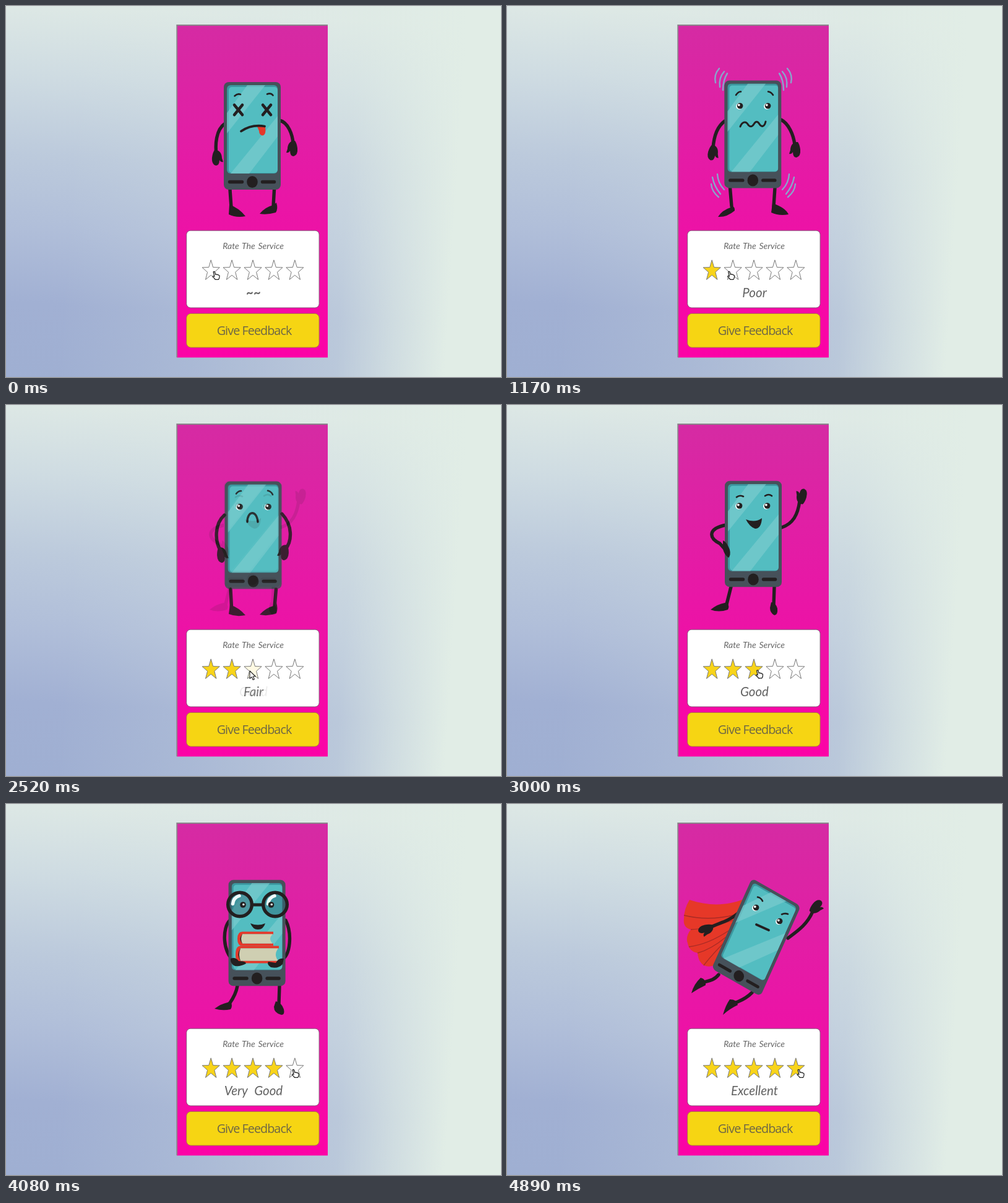
Write an HTML page that moves like this. It is 800 by 600 pixels and loops after 4.92 s.

```html
<!DOCTYPE html>
<html lang="en">
<head>
<meta charset="utf-8">
<title>Rate the service</title>
<style>
  html, body { margin: 0; width: 100%; height: 100%; overflow: hidden; }
  svg { display: block; width: 100vw; height: 100vh; }
  #poses { isolation: isolate; }
  .pose { mix-blend-mode: plus-lighter; }
  .limb { fill: none; stroke: #231f20; stroke-width: 5.4; stroke-linecap: round; }
  .line { fill: none; stroke: #231f20; stroke-width: 3; stroke-linecap: round; }
  .ink { fill: #231f20; }
  .label { font: italic 20.5px Lato, sans-serif; word-spacing: 6px; fill: #626262; text-anchor: middle; }
  .mark { font-weight: 700; }
  .title { font: italic 14px Lato, sans-serif; word-spacing: 1.5px; fill: #666; text-anchor: middle; }
  .button { font: 19.8px "Open Sans", "Noto Sans", sans-serif; letter-spacing: -.95px; fill: #6d6646; text-anchor: middle; }
</style>
</head>
<body>
<svg viewBox="0 0 800 600" preserveAspectRatio="none">
  <defs>
    <linearGradient id="sky" x1=".06" y1="0" x2="0" y2="1">
      <stop offset="0" stop-color="#dde8e5"/>
      <stop offset=".18" stop-color="#cfdce2"/>
      <stop offset=".4" stop-color="#bccadc"/>
      <stop offset=".6" stop-color="#b0bed9"/>
      <stop offset=".8" stop-color="#a1b0d3"/>
      <stop offset="1" stop-color="#9fafd2"/>
    </linearGradient>
    <linearGradient id="mist" gradientUnits="userSpaceOnUse" x1="100" y1="300" x2="725" y2="340">
      <stop offset="0" stop-color="#e1ede6" stop-opacity="0"/>
      <stop offset=".35" stop-color="#e1ede6" stop-opacity=".16"/>
      <stop offset=".72" stop-color="#e1ede6" stop-opacity=".4"/>
      <stop offset=".86" stop-color="#e1ede6" stop-opacity=".72"/>
      <stop offset="1" stop-color="#e1ede6"/>
    </linearGradient>
    <linearGradient id="pink" x1="0" y1="0" x2="0" y2="1">
      <stop offset="0" stop-color="#d52ba3"/>
      <stop offset=".5" stop-color="#e817a6"/>
      <stop offset="1" stop-color="#fc02a6"/>
    </linearGradient>
    <clipPath id="glass"><rect x="357" y="128" width="82" height="143" rx="6"/></clipPath>
    <g id="phone">
      <rect x="352" y="123" width="92" height="174" rx="8" fill="#46515a"/>
      <g clip-path="url(#glass)">
        <path fill="#3b979f" d="M357 128h82v143h-82z"/>
        <rect x="360" y="131" width="79" height="139" rx="5" fill="#53bdc1"/>
        <path fill="#7dcccf" opacity=".65" d="M390 128h29L357 206v-33zM439 178v33L393 271h-30z"/>
      </g>
      <ellipse class="ink" cx="398" cy="284.5" rx="8.8" ry="9.6"/>
      <path stroke="#231f20" stroke-width="5.4" stroke-linecap="round" d="M361.5 284.5h20M414.5 284.5h19"/>
    </g>
    <path id="hand" class="ink" d="M-4-12C5-13 8-5 8 1L10 7Q6 8 4 4Q4 13-2 13Q-9 11-8 0Q-7-8-4-12Z"/>
    <g id="eye">
      <circle cx="-.8" cy=".8" r="5" fill="#fff"/>
      <circle class="ink" cx=".6" r="4.8"/>
      <circle cx="-1.2" cy="-1.4" r="1.9" fill="#fff"/>
    </g>
    <g id="lens">
      <circle r="19.3" fill="#2d6c7b" fill-opacity=".5" stroke="#231f20" stroke-width="5.4"/>
      <path d="M-11.5-1Q-10.5-11-1-14" fill="none" stroke="#f1fafa" stroke-width="5.5" stroke-linecap="round"/>
    </g>
    <g id="shake" fill="none" stroke="#88a6cc" stroke-width="2.4" stroke-linecap="round">
      <path d="M343 101Q334 111 337 124M351 106Q342 116 344 131M356 109Q349 120 349 136"/>
      <path d="M330 288Q331 300 342 309M332 277Q335 292 345 304M340 272Q341 287 351 297"/>
    </g>
  </defs>

  <rect width="800" height="600" fill="url(#sky)"/>
  <rect width="800" height="600" fill="url(#mist)"/>
  <rect x="276" y="30.5" width="244" height="538" fill="url(#pink)"/>
  <path d="M276.2 568V31H520" fill="none" stroke="#8b838b" stroke-width="1.8"/>

  <rect x="291.7" y="363.2" width="214.4" height="124.8" rx="6.5" fill="#fff" stroke="#86597a"/>
  <rect x="291.7" y="497.4" width="214.4" height="54.8" rx="7" fill="#f6d513" stroke="#a97540"/>
  <text class="title" x="399.5" y="392.5">Rate The Service</text>
  <text class="button" x="401" y="532.3">Give Feedback</text>
  <g id="stars"></g>
  <g id="poses"></g>
  <g id="cursor" fill="#fff" stroke="#222" stroke-width="1.1" stroke-linejoin="round">
    <path id="arrow" d="M0 0V12.5L3 9.8L5.2 14.5L7.4 13.4L5.2 9H9.2Z"/>
    <path id="pointer" transform="scale(.86)" stroke-width="1.5" d="M-1 0Q1-1.5 2 1L3 5Q5 3.8 6 5.3Q8 4.5 8.6 6.2Q10.5 6 10.5 8Q10.8 12 8.5 14.5H2.5Q1 11.5-2 9.5Q-2.5 7.3 0 8.2L1 8.6Z"/>
  </g>
</svg>
<script>
const LOOP = 4920, FADE = 300;
const starts = [465, 1360, 2485, 3420, 4380];
const $ = id => document.getElementById(id);

const phone = (t = '') => `<use href="#phone" transform="${t}"/>`;
const limb = d => `<path class="limb" d="${d}"/>`;
const line = (d, w = 2.6) => `<path class="line" style="stroke-width:${w}" d="${d}"/>`;
const ink = d => `<path class="ink" d="${d}"/>`;
const fill = (d, c) => `<path fill="${c}" d="${d}"/>`;
const dot = (x, y, r, c) => `<circle cx="${x}" cy="${y}" r="${r}" fill="${c}"/>`;
const hand = (x, y, turn = 0, flip = 1) =>
  `<use href="#hand" transform="translate(${x} ${y}) rotate(${turn}) scale(${flip} 1)"/>`;
const eyes = (...spots) => spots.map(([x, y]) => `<use href="#eye" x="${x}" y="${y}"/>`).join('');
const lens = (x, y, eyeX) =>
  `<use href="#lens" x="${x}" y="${y}"/>` + dot(eyeX, y + .5, 4.8, '#231f20') + dot(eyeX + .8, y, 1.8, '#dfeeee');
const book = (x, y, w, h) =>
  fill(`M${x + w} ${y}H${x + 8}Q${x} ${y} ${x} ${y + h / 2}T${x + 8} ${y + h}H${x + w}v-4H${x + 8}V${y + 4}H${x + w}Z`, '#e5382a') +
  ink(`M${x + 8} ${y + 4}Q${x + 1} ${y + h / 2} ${x + 8} ${y + h - 4}Z`) +
  fill(`M${x + 8} ${y + 4}H${x + w - 1}Q${x + w - 9} ${y + h / 2} ${x + w - 1} ${y + h - 4}H${x + 8}Q${x + 4} ${y + h / 2} ${x + 8} ${y + 4}Z`, '#cfcfb2');

const dizzy =
  limb('M354 190C339 200 338 225 340 240M442 185C456 188 463 208 464 222M362 297L364 326M433.5 297L432 324') +
  hand(341, 245) + hand(463, 230, 0, -1) +
  ink('M361 321Q377 327 387 340Q372 343 360 337Z') +
  ink('M437 318Q440 328 436 334Q422 338 410 336Q419 325 432 322Z') +
  phone() +
  line('M369 160L382 176M382 160L369 176M415 160L428 176M428 160L415 176', 4.6) +
  line('M369.5 145.5Q374 141 379 143M422 142.5Q428 140 431.5 144.5') +
  fill('M406 195Q412 191 419 195Q421 209 414 209.5Q409 208 409 202Z', '#e5382a') +
  line('M380 202.5Q397 191 418 194.5', 3.8);

const shaky =
  limb('M352 186C338 196 334 215 333 230M443 184C455 190 463 208 465 224M360.5 294L363 324M433 294L431 324') +
  hand(333, 237, 10) + hand(466, 232, 0, -1) +
  ink('M361 321Q369 325 368 331Q355 342 341 341Q348 330 361 326Z') +
  ink('M429 319Q450 326 455 337Q440 340 427 334Z') +
  phone('translate(-.7 -2.6)') +
  eyes([376, 161.5], [421, 161.5]) +
  line('M370 144Q374 138 378 138.5M422 138.5Q427 139 430 144') +
  line('M377 195C380 187 386 186 389 191S396 196 399 191S405 186 408 191S416 196 418 187', 3) +
  '<use href="#shake"/><use href="#shake" transform="translate(796 0) scale(-1 1)"/>';

const sad =
  phone('translate(1.6 .6)') +
  limb('M353 178C337 192 337 220 347 236M446 176C463 194 463 220 451 234M363 298L364.5 327M436.5 298L434 327') +
  hand(349, 242, -8) + hand(449, 238, 8, -1) +
  ink('M362 323Q377 328 387 340Q372 343 360 338Z') +
  ink('M437 320Q440 329 437 337Q423 342 410 339Q420 328 432 325Z') +
  eyes([377.5, 164.5], [423.5, 164.5]) +
  line('M372 143.5Q376 138.5 380 139M423 138.5Q429 140 431 145') +
  line('M390 189C390 171 405 169 407 189', 3.4);

const waving =
  limb('M354 194C324 200 326 215 344 224L353 234M444 198C462 192 470 178 473 155M362 294L355 322M432 294L431 324') +
  hand(476, 148, 190) +
  ink('M356 319Q360 326 357 331Q342 336 329 331Q340 322 352 320Z') +
  ink('M427 319Q434 319 437 329Q438 340 432 340Q425 336 425 328Z') +
  phone('translate(0 1.5) scale(1 .986)') +
  ink('M349 219Q355 221 360 234Q362 243 358 247Q350 241 349 232Z') +
  eyes([375, 163], [420, 163]) +
  line('M371 149Q376 145 382 148M417 147Q423 143 428 147') +
  ink('M386 185Q401 191 412 183Q411 200 401 200Q392 197 386 185Z');

const bookish =
  limb('M362 188C349 200 350 240 368 253M452 188C462 208 461 245 444 253M374 294C372 306 366 316 361 323M442 294L441 323') +
  ink('M363 319Q367 327 363 332Q350 335 337 331Q348 323 358 321Z') +
  ink('M436 319Q446 322 449 332Q451 341 445 341Q433 338 433 328Z') +
  phone('translate(7.6 1.5) scale(1 .986)') +
  lens(378, 162.5, 383) + lens(435, 162.5, 428.5) + line('M399 163H415', 5) +
  ink('M395 193Q407 198 419 193Q416 203 407 203Q399 203 395 193Z') +
  book(374, 206.5, 58, 23) + book(371, 229.5, 70, 28) +
  ink('M363 250Q371 247 376 254Q388 254 388 258Q380 263 370 262Q362 258 363 250Z') +
  ink('M449 250Q441 248 436 257L424 255Q421 259 428 264Q440 267 447 259Z');

const hero =
  fill('M382 154C355 165 325 165 295 155Q286 170 286 185Q284 200 297 203Q288 215 292 225Q294 238 308 241Q309 255 318 261Q328 265 336 260L380 175Z', '#e63828') +
  '<path d="M370 179Q325 190 286 180M365 188Q325 202 297 203M358 205Q325 227 294 231M354 215Q330 235 308 241M350 225Q330 245 318 261" fill="none" stroke="#a92b25" stroke-width="1.3"/>' +
  limb('M373 177C355 192 342 192 328 200M454 217C470 205 485 195 494 174M342 276C335 285 326 286 318 288M396 305C385 316 377 318 370 321') +
  hand(322, 203, 72) + hand(500, 167, 225, -1) +
  ink('M298 306Q302 291 313 281Q322 283 321 293Q308 299 298 306Z') +
  ink('M349 341Q353 326 360 316Q372 316 373 325Q360 331 349 341Z') +
  phone('matrix(.859 .49 -.376 .84 139.8 -155.8)') +
  eyes([402, 167.5], [440, 189.5]) +
  line('M405 150.5Q411 152 413 157M444 178.5Q449 176 454 178') +
  line('M403 195L423 204', 3.8);

const poses = [
  [dizzy, '~~', 'mark'], [shaky, 'Poor'], [sad, 'Fair'],
  [waving, 'Good'], [bookish, 'Very Good'], [hero, 'Excellent']
];
$('poses').innerHTML = poses.map(([art, word, kind = '']) =>
  `<g class="pose">${art}<text class="label ${kind}" x="400" y="470.5">${word}</text></g>`).join('');

const starX = i => 331.2 + 33.9 * i;

function starPath(cx) {
  const pts = [...Array(10)].map((_, k) => {
    const a = k * Math.PI / 5, r = k % 2 ? .4 : 1;
    return `${(cx + 14.8 * r * Math.sin(a)).toFixed(2)} ${(428.3 - 17.5 * r * Math.cos(a)).toFixed(2)}`;
  });
  return `M${pts.join('L')}Z`;
}
$('stars').innerHTML = starts.map((_, i) =>
  `<path d="${starPath(starX(i))}" fill="#f8d41a" stroke="#777"/>`).join('');

const layers = [...$('poses').children], stars = [...$('stars').children];
const clamp = v => Math.max(0, Math.min(1, v));
const path = [
  [0, 336, 430], [180, 336, 430], [400, 328, 428], [780, 328, 428],
  [1250, 361, 430], [1720, 361, 430], [2350, 394, 430], [2820, 394, 430],
  [3320, 429, 428], [3740, 429, 428], [4060, 464, 430], [4300, 471, 430], [LOOP, 471, 430]
];

function cursorAt(t) {
  const i = path.findIndex(p => p[0] > t);
  const [t0, x0, y0] = path[i - 1], [t1, x1, y1] = path[i];
  const u = (t - t0) / (t1 - t0), e = u * u * (3 - 2 * u);
  return [x0 + (x1 - x0) * e, y0 + (y1 - y0) * e];
}

function draw(t) {
  const shown = starts.map(s => clamp((t - s) / FADE));
  layers.forEach((g, i) => {
    const o = (i ? shown[i - 1] : 1) - (shown[i] || 0);
    g.style.opacity = o;
    g.style.display = o > 0 ? '' : 'none';
  });
  stars.forEach((s, i) => s.setAttribute('fill-opacity', shown[i]));

  const [x, y] = cursorAt(t);
  const fading = shown.some(p => p > 0 && p < 1);
  const onStar = stars.some((_, i) => Math.abs(x - starX(i)) < 9);
  const link = onStar && !fading;
  $('cursor').setAttribute('transform', `translate(${x} ${y})`);
  $('pointer').style.display = link ? '' : 'none';
  $('arrow').style.display = link ? 'none' : '';
}

const begin = performance.now();
function tick() {
  draw((performance.now() - begin) % LOOP);
  requestAnimationFrame(tick);
}
tick();
</script>
</body>
</html>
```
